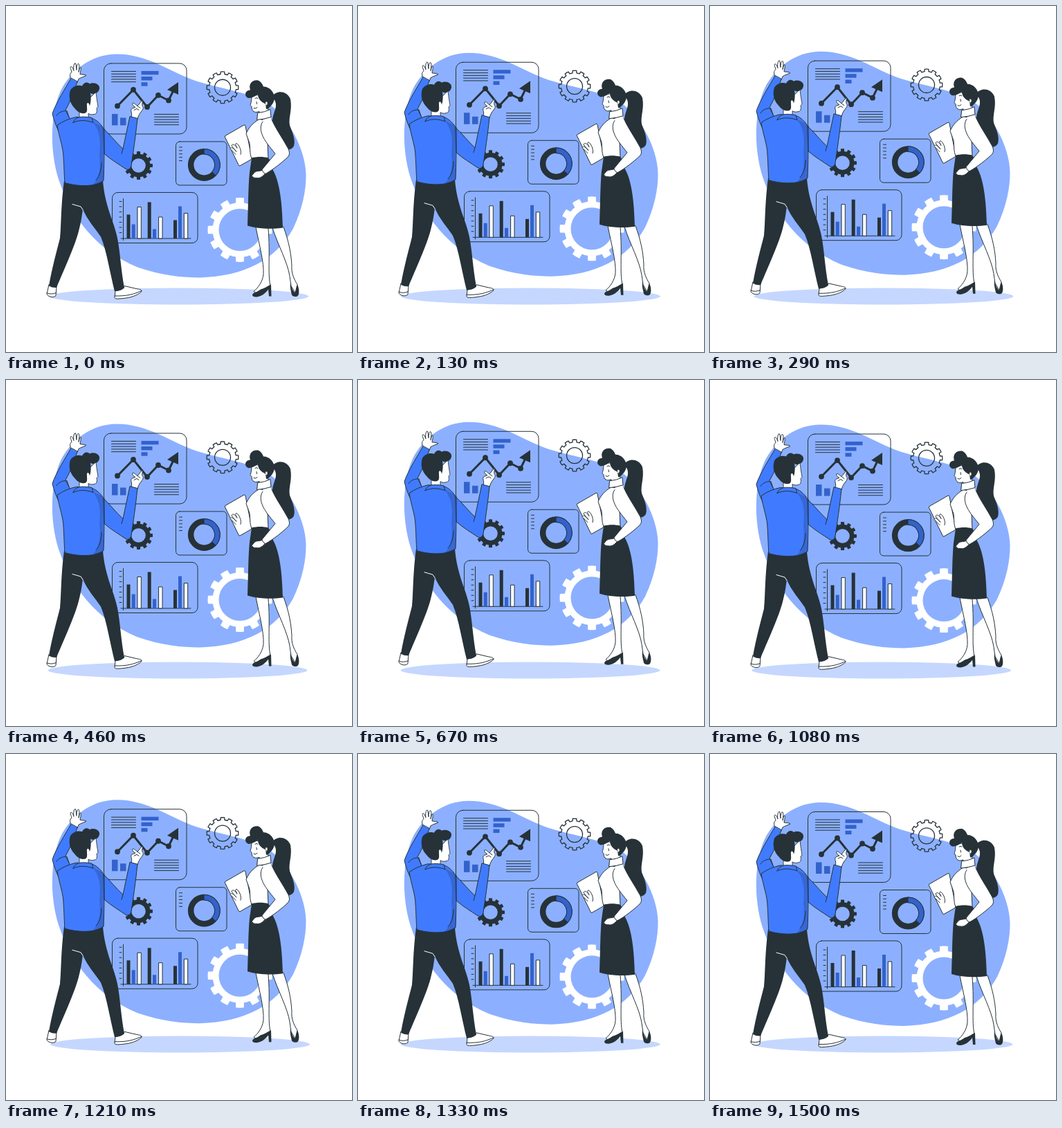
Write an HTML page that moves like this. It is 500 by 500 pixels and loops after 1540 ms.

```html
<!DOCTYPE html>
<html lang="en">
<head>
<meta charset="utf-8">
<title>Data team</title>
<style>
html, body { margin: 0; height: 100%; overflow: hidden; background: #fff; }
svg { display: block; width: 100vw; height: 100vh; }
.line { fill: none; stroke: #263238; }
.skin { fill: #fff; stroke: #263238; }
.shirt { fill: #407bff; stroke: #263238; }
.dark { fill: #263238; }
.blue { fill: #3362cc; }
.shade { fill: #000; opacity: .16; }
path, rect { stroke-linejoin: round; stroke-linecap: round; }
</style>
</head>
<body>
<svg viewBox="0 0 500 500">
  <ellipse id="shadow" cx="250" cy="419.5" rx="187.5" ry="12" fill="#c5d7ff"/>
  <g id="scene">
    <path fill="#8cb0ff" d="M160 69C122 69 93 94 79 122C65 152 62 205 76 250C95 305 130 352 190 377C225 389 255 392 280 392C345 390 390 366 415 321C428 294 434 265 433.500 243C433 205 405 155 375 138C345 123 310 119 275 108C235 94 205 69 160 69Z"/>
    <g id="gears"></g>

    <g id="report" transform="translate(0 -.5)">
      <rect class="line" x="141.500" y="83" width="119.500" height="102" rx="10"/>
      <path class="line" stroke-width="3" d="M161 144.500L184 121L204 146L220 129L235 136.500L243 120"/>
      <path class="dark" d="M249 110V128L233 121Z"/>
    </g>

    <g id="donut">
      <rect class="line" x="245.500" y="195.500" width="73.500" height="63" rx="5.500"/>
      <circle class="line" cx="286.300" cy="229" r="19.200" stroke-width="8.500"/>
      <path class="blue" stroke="#263238" d="M286.300 206A23 23 0 0 1 303.300 244.500L297.500 239.300A15.200 15.200 0 0 0 286.300 213.800Z"/>
    </g>

    <g id="bars">
      <rect class="line" x="153.500" y="269" width="123.500" height="73" rx="8"/>
      <path class="line" d="M169.500 278V338M166 335.500H267"/>
    </g>

    <g id="man">
      <path class="skin" d="M94 106C92 100 92 97 95 95C94 91 92 88 94 87C96 87 97 91 98 93C97 88 98 83 100 82C102 84 101 89 102 92C102 87 103 82 105 83C107 86 105 92 105 95C106 92 106 88 108 88C109 91 107 96 107 98C110 99 114 98 116 100C112 102 108 103 105 105L103 110Z"/>
      <path class="shirt" d="M94 104C86 118 72 140 67 155C69 164 73 175 77 182L95 168L86 150C93 138 99 122 103 109Z"/>
      <path class="line" d="M73 158C76 153 82 151 88 151L91 160"/>

      <path class="skin" d="M62 402L59 416C62 421 70 421 72 418L73 405M59 414.500C63 416 68 416 72.500 414"/>
      <path class="skin" d="M158 411L157 421C158 423 160 423 170 422C180 421 190 418 196 412C196 409 193 409 188 408L171 404C170 409 164 411 158 411ZM157 418.500C175 419 185 416 196 411"/>
      <path class="dark" d="M84 252C79 290 80 318 78 335C73 355 66 380 62 404Q67 407 73 406.500C85 378 100 345 105 325C109 310 110 300 111 293C117 308 129 321 137 333C146 355 150 385 157 412Q166 411 171 407C166 380 165 355 161 335C156 310 143 290 140 252Z"/>
      <path fill="none" stroke="#fff" d="M96 286L108 289.500L111 294"/>

      <path class="shirt" d="M101 160C92 162 82 166 74 172C77 190 83 205 83 218C84 230 84 245 85 255C102 260 127 262 141 252C142 230 142 205 142 178C137 170 132 165 125 162Z"/>
      <path class="shade" d="M124 166L140 174L141 252C136 256 130 258 126 257C135 248 137 234 135 215C137 195 136 178 124 166Z"/>
      <path class="line" d="M130 251C136 245 138 234 138 226"/>

      <path class="skin" stroke-width=".9" d="M130 124C131 133 132 139 133 145L131 147C132 152 131 156 127 156C124 157 121 156 119 155V161C114 163 109 162 106 160V148Z"/>
      <path class="dark" d="M130 125C127 127 124 127 122 125C123 131 123 138 121 144C120 138 116 138 117 144C117 149 118 152 115 154C111 156 104 154 99 147C92 140 90 130 93 121C97 115 104 113 110 115C113 109 118 109 121 112C126 109 136 112 135 119C134 123 132 125 130 125Z"/>
      <path class="shirt" d="M98 166C101 160 108 158 124 161L126 168C115 164 106 164 97 168Z"/>

      <path class="skin" d="M181 161C183 155 180 152 181 149C182 147 185 147 187 146C184 144 182 142 183 140C185 139 188 143 190 144C193 141 195 137 197 136C198 138 196 141 197 144C200 147 197 150 194 154C192 157 191 159 190 163ZM185 150L189 148L192 150M190 144L194 147"/>
      <path class="shirt" d="M141 177C150 185 160 198 169 206L179 159L190 162C187 190 184 210 181 230C180 235 177 237 173 235C163 228 152 222 142 213Z"/>
      <path class="line" d="M169 206L167 213M142 178V213"/>
    </g>

    <g id="woman">
      <path class="dark" d="M385 130C390 121 406 121 411 134C414 150 408 160 410 172C413 180 419 192 416 202C413 207 408 208 402 206C400 195 390 185 386 172C382 160 391 150 390 141Q389 134 385 133Z"/>
      <path class="skin" d="M361 319C366 345 373 370 372 387C371 398 364 407 358 412Q362 416 370 412L382 404C378 385 382 360 379 321ZM385 320C393 345 407 370 410 390L412 404L418 414L421 402C416 394 412 385 413 375C412 355 408 338 401 319Z"/>
      <path class="dark" d="M356 417C357 413 362 414 368 409C373 408 378 404 383 402L383.500 419H380L379 409C375 415 369 419 362 420C358 420 356 419 356 417ZM411 400C413 408 415 412 418 414L421 402C424 408 424 415 422 418C419 421 414 419 413 417C412 412 410 406 411 400Z"/>

      <path class="skin" d="M317 187L344 171.500Q345.500 171 346 173L355 219Q355 221 353 222L338 230.500Q336.500 231 336 229L316.500 189Z"/>
      <path class="skin" d="M366 163C356 169 351 175 347 184L352 198C353 206 352 213 355 220H379L378 198L385 168Z"/>
      <path class="dark" d="M355 219C363 217 372 217 379 219C384 225 383 232 386 237C396 255 399 285 400 320C385 322 365 322 349 317C350 290 350 260 352 240Z"/>
      <path class="skin" d="M372 236C368 239 362 237 359 240L355 245Q358 249 362 248C367 249 371 246 375 241Z"/>
      <path class="skin" d="M376 163C367 166 367 178 370 185C373 194 382 204 389 213L370 236Q371 241 375 242C386 236 400 225 408 217Q411 213 408 206C400 191 391 179 384 164Z"/>
      <path fill="#fff" d="M371 164L382 160L386 170L373 174Z"/>
      <path class="skin" d="M339 214C341 209 337 200 333 198C330 199 333 202 334 205C331 200 328 198 326 201C327 204 331 207 333 210C328 204 325 203 324 206C327 209 330 212 332 214"/>

      <path class="skin" d="M355 129C355 136 354 140 353 143L355 145C355 151 358 153 362 153L366 152V160L379 158V146L375 128Z"/>
      <path class="skin" d="M364 154Q374 153 382 149L383 160Q374 163 363 164Z"/>
      <path class="line" d="M362 138L362.500 141M360 133Q362 131 364 133M358 147Q361 149 363 146"/>
      <path class="dark" d="M346 127C346 123 350 121 353 121C350 112 356 106 364 107C368 108 371 113 372 116C381 116 388 124 388 133C387 141 382 145 377 149C374 146 377 142 375 141C368 138 364 133 364 127C359 131 351 134 349 132C347 131 346 129 346 127Z"/>
      <path class="skin" stroke-width=".8" d="M375 141C373 137 379 136 378 141Q377 144 375 143"/>
    </g>
  </g>
</svg>
<script>
const $ = id => document.getElementById(id);

function add(parent, tag, attrs) {
  const node = document.createElementNS("http://www.w3.org/2000/svg", tag);
  for (const key in attrs) node.setAttribute(key, attrs[key]);
  $(parent).appendChild(node);
}
const rect = (parent, cls, x, y, width, height) =>
  add(parent, "rect", { class: cls, x, y, width, height });

const rules = (parent, x, length, y, gap, count) => {
  for (let i = 0; i < count; i++)
    add(parent, "path", { class: "line", d: `M${x} ${y + i * gap}h${length}` });
};

// Twelve-toothed wheel with a round hole
function gear(cx, cy, outer, root, hole, attrs) {
  const at = (r, a) => `${cx + r * Math.cos(a)} ${cy + r * Math.sin(a)}`;
  let d = "";
  for (let i = 0; i < 12; i++) {
    const a = i * Math.PI / 6;
    d += (i ? `A${root} ${root} 0 0 1 ` : "M") + at(root, a - .15) +
      `L${at(outer, a - .125)}A${outer} ${outer} 0 0 1 ${at(outer, a + .125)}L${at(root, a + .15)}`;
  }
  d += `A${root} ${root} 0 0 1 ${at(root, -.15)}ZM${cx - hole} ${cy}a${hole} ${hole} 0 1 0 ${2 * hole} 0a${hole} ${hole} 0 1 0 ${-2 * hole} 0Z`;
  add("gears", "path", { d, "fill-rule": "evenodd", ...attrs });
}
gear(313, 117.3, 22.8, 19.5, 11.5, { class: "line", "stroke-width": 1.3 });
gear(191.5, 230, 20.5, 17, 10.3, { class: "dark" });
gear(338, 323, 46.5, 39.5, 30.5, { fill: "#fff" });

rules("report", 152.5, 35, 94.5, 3.8, 5);
rules("report", 214.5, 35, 156.5, 3.8, 5);
rules("donut", 250.5, 4, 203.5, 4.9, 5);
rules("bars", 164, 3, 282, 7.5, 7);

[[195.5, 94, 25, 5.3], [195.5, 102, 16, 5.5], [195.5, 110.3, 9, 5.4],
 [153, 156, 8.5, 16.5], [165, 161.5, 8.5, 11]].forEach(box => rect("report", "blue", ...box));
[[161, 144.5], [184, 121], [204, 146], [220, 129], [235, 136.5]].forEach(([cx, cy]) =>
  add("report", "circle", { class: "dark", cx, cy, r: 3.9 }));

const fills = ["dark", "blue", "skin"];
[[174.5, 301], [181.7, 315], [190.3, 290], [204.7, 283], [212, 322], [221, 304.5],
 [242, 309], [249, 289], [257.7, 299]].forEach(([x, y], i) =>
  rect("bars", fills[i % 3], x, y, 5, 335.5 - y));

const LOOP = 1540, LEAD = 40;
const sway = [0, -1, 2, -4, 4, -4, 4, -4, 2, -1, 0];

function frame(now) {
  const p = ((now + LEAD) % LOOP) / LOOP;
  const step = Math.floor(p * 10), part = p * 10 - step;
  const dx = sway[step] + (sway[step + 1] - sway[step]) * part;
  const dy = 1 - 10 * (1 - Math.abs(1 - 2 * p));
  $("shadow").setAttribute("transform", `translate(${dx} 0)`);
  $("scene").setAttribute("transform", `translate(0 ${dy})`);
}

const start = performance.now();
(function tick() {
  frame(performance.now() - start);
  requestAnimationFrame(tick);
})();
</script>
</body>
</html>
```
